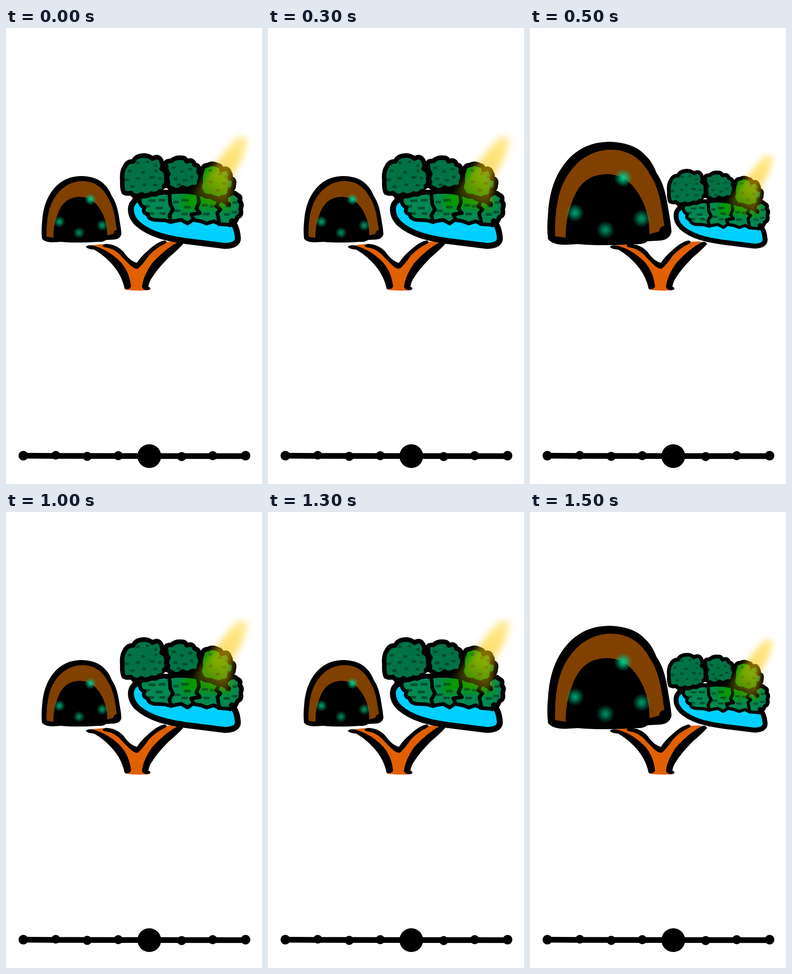
An HTML page that plays this animation: 561 px wide and 998 px high, repeating every 2000 ms.

```html
<!DOCTYPE html>
<html lang="en">
<head>
<meta charset="utf-8">
<title>Cave and forest in balance</title>
<style>
  html, body { margin: 0; width: 100%; height: 100%; overflow: hidden; background: #fff; }
  svg { display: block; width: 561px; height: 998px; }
  .ink { fill: none; stroke: #000; stroke-linecap: round; stroke-linejoin: round; }
</style>
</head>
<body>
<svg viewBox="0 0 561 998">
  <defs>
    <radialGradient id="spark">
      <stop offset="0" stop-color="#00d996" stop-opacity=".95"/>
      <stop offset=".35" stop-color="#00c68b" stop-opacity=".72"/>
      <stop offset="1" stop-color="#00b47e" stop-opacity="0"/>
    </radialGradient>
    <linearGradient id="sun" gradientUnits="userSpaceOnUse" x1="522" y1="235" x2="425" y2="385">
      <stop offset="0" stop-color="#ffcb00" stop-opacity=".38"/>
      <stop offset=".25" stop-color="#ffcb00" stop-opacity=".52"/>
      <stop offset=".6" stop-color="#f0c000" stop-opacity=".56"/>
      <stop offset=".82" stop-color="#a89000" stop-opacity=".5"/>
      <stop offset="1" stop-color="#30a000" stop-opacity=".2"/>
    </linearGradient>
    <filter id="soft" x="-30%" y="-30%" width="160%" height="160%"><feGaussianBlur stdDeviation="8"/></filter>
    <path id="crownA" d="M258 360Q254 350 255 335Q253 314 260 304Q266 291 279 292Q284 279 304 279Q315 280 321 286Q335 277 341 292Q345 302 341 308Q354 313 351 330Q354 341 346 346Q350 357 336 358Q329 368 319 362Q306 372 297 364Q283 373 274 361Q266 364 258 360Z"/>
    <path id="crownB" d="M351 303Q346 290 362 291Q372 282 384 284Q393 283 396 292Q410 286 413 299Q426 301 422 315Q430 324 423 337Q424 350 409 348Q397 356 387 349Q374 361 364 351Q352 349 355 337Q350 328 356 319Q350 311 351 303Z"/>
    <path id="crownC" d="M430 312Q431 300 443 300Q452 294 465 301Q473 302 472 311Q486 303 490 317Q494 323 490 329Q503 329 499 344Q499 354 490 355Q491 370 475 370Q461 380 449 368Q433 371 429 359Q421 350 427 338Q425 323 430 312Z"/>
    <path id="bushes" d="M291 374Q328 368 360 364Q397 359 430 366Q459 371 487 381L490 364Q500 357 507 366Q514 368 511 379Q519 385 514 396Q518 410 507 414Q504 427 491 431L478 428L466 429L455 423L440 428L427 423L412 421L398 428L384 420L362 424L348 421L326 420Q309 418 311 408Q295 404 305 395Q289 391 291 374Z"/>
  </defs>

  <g id="timeline">
    <path class="ink" stroke-width="12.5" d="M38 936L100 936.5L526 937"/>
  </g>

  <g id="branch">
    <path fill="#e06000" d="M182 476L213 473Q255 488 287 524Q310 488 346 468L376 467Q328 505 309 545L312 574Q288 576 262 573Q255 515 182 476Z"/>
    <path d="M175 479Q178 474 190 476Q225 485 252 513Q271 535 274 566Q270 574 260 571Q254 542 235 520Q215 497 193 485Q178 484 175 479Z"/>
    <path d="M375 469Q386 466 388 473Q376 486 357 502Q332 527 321 545Q314 554 312 566Q320 570 314 573Q302 576 298 567Q300 544 320 515Q346 486 375 469Z"/>
    <path d="M212 476Q215 470 231 474Q251 479 262 496Q274 511 287 514Q295 501 309 489Q332 467 348 465Q355 468 349 472Q329 481 313 498Q300 517 290 526Q283 530 270 517L255 502Q240 483 217 480Q212 479 212 476Z"/>
  </g>

  <g id="cave">
    <path d="M79 461Q77 445 79 425C81 391 91 366 109 347C126 330 145 324 167 324C189 325 206 331 217 344Q225 351 232 368C242 382 246 401 249 422Q252 437 253 451Q250 462 237 463L219 464Q214 469 201 468Q155 471 121 468L103 469Q85 469 79 461Z"/>
    <path fill="#804000" d="M89 457Q88 424 94 401C102 369 126 336 167 335C195 335 212 350 222 369C237 391 239 417 243 442Q235 444 236 450L222 454C222 424 212 402 199 387Q185 370 162 369.5C134 370 121 386 113 408Q103 433 104 459Z"/>
  </g>

  <g id="forest">
    <path fill="#00d0ff" d="M291 376C270 384 269 410 288 428C315 454 354 461 400 467L480 477Q510 477 508 458C507 429 493 386 469 376C419 357 340 360 291 376Z"/>
    <path d="M346 354L430 352L490 360L486 382L430 368L350 368Z"/>
    <g fill="#007243">
      <use href="#crownA"/><use href="#crownB"/><use href="#crownC"/>
      <use href="#bushes" fill="#008850"/>
    </g>
    <clipPath id="leaves"><use href="#crownC"/><use href="#bushes"/></clipPath>
    <g clip-path="url(#leaves)">
      <path filter="url(#soft)" fill="#009600" d="M420 285H462L485 335L492 398L445 392L385 398V368L420 350Z"/>
    </g>
    <path class="ink" stroke-width="6" style="stroke:#003f28" opacity=".72" d="M288 295h2M309 293h2M327 301h2M270 313h2M299 316h3M328 313h1M263 332h4M287 329h4M317 327h6M336 329h2M275 347h4M302 343h2M326 344h3M365 306h4M385 314h2M403 309h2M369 330h4M390 333h4M406 326h2M377 343h3M447 312h2M467 319h4M482 325h4M447 337h3M476 340h4M462 355h4M488 350h2M315 378h10M337 377h10M302 390h11M331 394h10M308 406h14M339 406h8M369 381h7M387 377h11M371 400h9M393 392h9M387 407h9M432 388h8M449 390h7M435 407h9M483 390h7M499 382h5M480 408h8M497 403h7"/>
    <g class="ink">
      <path stroke-width="13" d="M291 374C268 381 269 409 288 428C315 452 354 461 400 467L480 477Q510 476 508 458Q506 435 495 423"/>
      <g stroke-width="10">
        <use href="#crownA"/><use href="#crownB"/><use href="#crownC"/>
        <path d="M282 372L300 368Q345 359 365 358Q405 355 438 367Q472 373 488 386"/>
        <path d="M490 364Q500 357 507 366Q516 368 512 379Q519 385 514 396Q518 410 507 414Q504 427 491 431"/>
      </g>
      <path stroke-width="8" d="M293 375Q292 389 304 393Q297 404 311 408Q311 418 326 420L348 421L362 425L358 410L366 397L360 386L358 362M362 424L384 420L398 428L411 419L406 408L425 405L417 395L423 382L420 360M410 420L427 423L440 428L455 423L468 429L463 405L470 397L461 390L470 373M466 429L491 431"/>
    </g>
    <path fill="#fff" d="M344 354L350 350L356 354Z"/>
    <path filter="url(#soft)" fill="url(#sun)" d="M509 237L530 241Q523 285 497 320L488 392L388 392L428 340Q475 272 509 237Z"/>
  </g>
</svg>
<script>
  const cave = document.getElementById('cave');
  const forest = document.getElementById('forest');
  const timeline = document.getElementById('timeline');

  function addCircle(parent, cx, cy, r, fill, opacity = 1) {
    const dot = document.createElementNS(parent.namespaceURI, 'circle');
    for (const [name, value] of Object.entries({ cx, cy, r, fill, opacity })) dot.setAttribute(name, value);
    parent.append(dot);
  }

  const sparks = [[185, 375, 1], [117, 424, .8], [160, 448, .7], [211, 432, .75]];
  for (const [x, y, opacity] of sparks) addCircle(cave, x, y, 13, 'url(#spark)', opacity);

  const stops = [[38, 936, 10.5], [109, 935, 9.5], [178, 937.5, 10], [246, 936, 10],
                 [314, 937, 26], [385, 938, 10], [453, 936, 10], [525, 936, 10.5]];
  for (const [x, y, r] of stops) addCircle(timeline, x, y, r, '#000');

  // The two worlds trade sizes every half second.
  function draw(now) {
    const swapped = Math.floor(now / 500) % 2 === 1;
    cave.setAttribute('transform', swapped ? 'translate(-83.3 -254.8) scale(1.555)' : '');
    forest.setAttribute('transform', swapped ? 'translate(92 80) scale(.833)' : '');
    requestAnimationFrame(draw);
  }
  draw(0);
</script>
</body>
</html>
```
